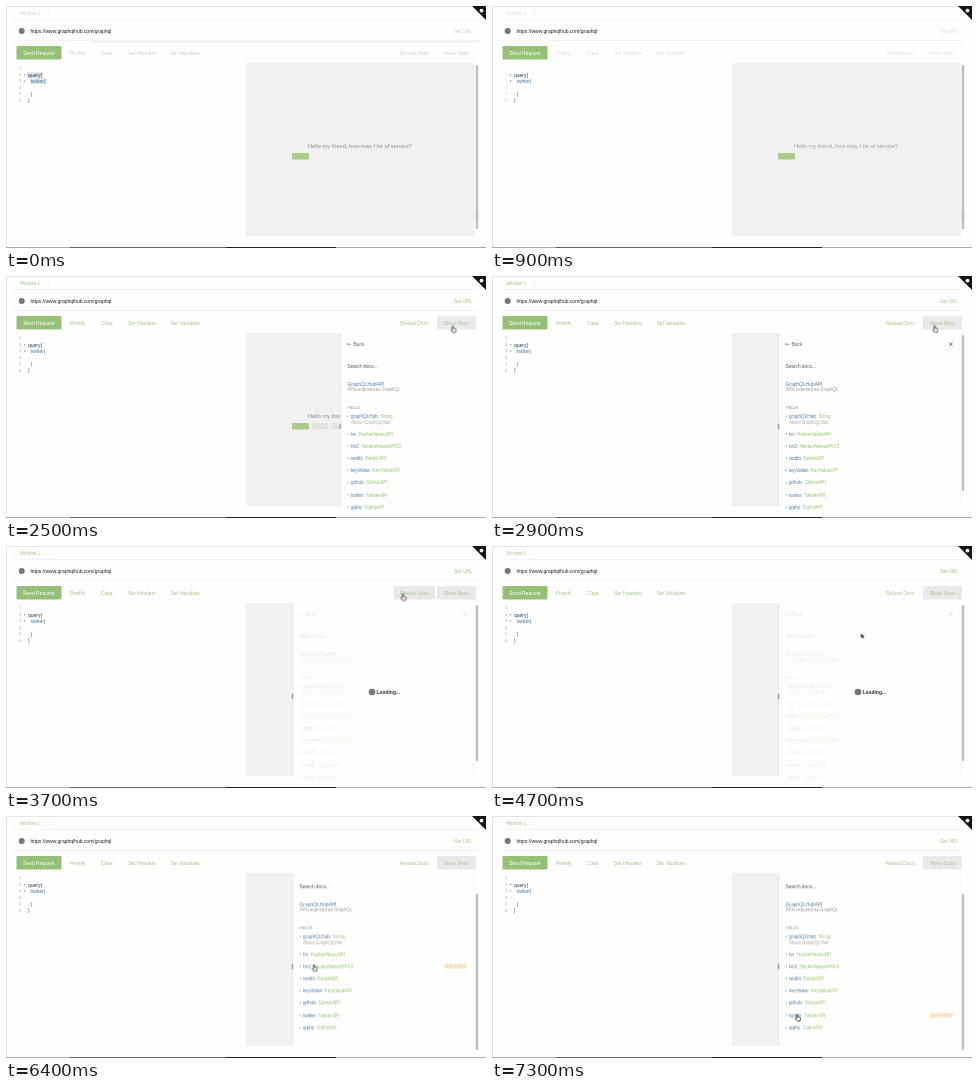
Write an HTML page that moves like this. It is 480x242 px and loops after 8000 ms.

```html
<!DOCTYPE html>
<html lang="en">
<head>
<meta charset="utf-8">
<title>API explorer</title>
<style>
  html, body { margin: 0; width: 100%; height: 100%; overflow: hidden; background: #fff; }
  svg { display: block; width: 100%; height: 100%; font: 5px "Liberation Sans", Arial, sans-serif; }
  .a { animation: 8s linear infinite; }
  .step { animation-timing-function: step-end; }

  .labels { animation-name: labels; fill: #a3c587; }
  @keyframes labels {
    0%, 1% { fill: #ccd0c9; }
    12%, 24% { fill: #e0e2de; }
    30%, 100% { fill: #a3c587; }
  }
  .nums { animation-name: nums; }
  @keyframes nums {
    0%, 1% { fill: #aaa; }
    12%, 24% { fill: #ddd; }
    30%, 100% { fill: #a8a8a8; }
  }
  .marks { animation-name: marks; }
  @keyframes marks { 0%, 1% { opacity: 1; } 11%, 100% { opacity: 0; } }

  .greet { animation-name: greet; }
  @keyframes greet {
    0%, 1% { fill: #8c8c8c; }
    12%, 24% { fill: #a4a4a4; }
    30%, 100% { fill: #888; }
  }
  .pills { animation-name: pills; }
  @keyframes pills { 0%, 24% { opacity: 0; } 30%, 100% { opacity: 1; } }

  .show { animation-name: show; }
  @keyframes show { 0% { opacity: 0; } 25%, 100% { opacity: 1; } }
  .reload { animation-name: reload; }
  @keyframes reload { 0% { opacity: 0; } 43.75% { opacity: 1; } 48.75%, 100% { opacity: 0; } }

  .panel { animation-name: slide; }
  @keyframes slide {
    0% { transform: translateX(184px); }
    29.375% { transform: translateX(184px); animation-timing-function: ease; }
    33.625%, 100% { transform: none; }
  }
  .docs { animation-name: docs; }
  @keyframes docs { 0% { opacity: 1; } 45% { opacity: .16; } 60%, 100% { opacity: 1; } }
  .load { animation-name: load; }
  @keyframes load { 0% { opacity: 0; } 45% { opacity: 1; } 60%, 100% { opacity: 0; } }
  .scroll { animation-name: scroll; }
  @keyframes scroll {
    0%, 74% { transform: none; animation-timing-function: ease-in-out; }
    79%, 100% { transform: translateY(-19.7px); }
  }
  .thumb { animation-name: thumb; }
  @keyframes thumb {
    0%, 74% { transform: none; animation-timing-function: ease-in-out; }
    79%, 100% { transform: translateY(19px); }
  }
  .bar { animation-name: bar; }
  @keyframes bar { 0% { opacity: 1; } 29.3% { opacity: 0; } 33.6%, 100% { opacity: 1; } }
  .tail { animation-name: tail; }
  @keyframes tail { 0% { opacity: 1; } 29.3%, 100% { opacity: 0; } }

  .tag { animation-name: tag; }
  @keyframes tag {
    0% { opacity: 0; transform: translateY(140.5px); }
    70% { opacity: 1; transform: translateY(140.5px); }
    76.25% { opacity: .8; transform: translateY(150.3px); }
    81.25% { opacity: .8; transform: translateY(162.5px); }
    83.5% { opacity: .8; transform: translateY(174.7px); }
    86.25% { opacity: .8; transform: translateY(187px); }
    88.75%, 100% { opacity: .8; transform: translateY(199.2px); }
  }

  .cursor { animation-name: move; }
  @keyframes move {
    0%, 12.5% { transform: translate(330px, 130px); animation-timing-function: ease-in-out; }
    18.75%, 23.75% { transform: translate(453.5px, 48.5px); }
    27%, 33.75% { transform: translate(447.5px, 53.5px); }
    42.5% { transform: translate(433px, 52.5px); }
    45%, 47.5% { transform: translate(397.5px, 51.5px); animation-timing-function: ease-in-out; }
    53.75%, 62.5% { transform: translate(370.5px, 90px); animation-timing-function: ease-in-out; }
    67.5%, 79% { transform: translate(309px, 147px); }
    83.75% { transform: translate(307px, 171.5px); }
    85% { transform: translate(307px, 172px); }
    91.25%, 100% { transform: translate(306px, 202px); }
  }
  .hand { animation-name: hand; }
  @keyframes hand { 0% { opacity: 0; } 17.5% { opacity: 1; } 48.75% { opacity: 0; } 66.25%, 100% { opacity: 1; } }
  .arrow { animation-name: arrow; }
  @keyframes arrow { 0% { opacity: 0; } 12.5% { opacity: 1; } 17.5% { opacity: 0; } 48.75% { opacity: 1; } 66.25%, 100% { opacity: 0; } }
</style>
</head>
<body>
<svg viewBox="0 0 480 242" preserveAspectRatio="none">
  <defs>
    <clipPath id="view"><rect x="240" y="57" width="229" height="178"/></clipPath>
  </defs>
  <rect width="480" height="242" fill="#fefefe"/>

  <!-- window frame -->
  <path d="M0 .5H480M.5 0V242" stroke="#e4e4e4" fill="none"/>
  <path d="M0 241.5H480" stroke="#aaa"/>
  <path d="M64 241.5H220" stroke="#666"/>
  <path d="M220 241.5H330" stroke="#222"/>
  <path d="M7 13.5H473M42.5 4V10M7 34.5H473" stroke="#f4f4f4" fill="none"/>
  <path class="a marks" d="M85 36H473" stroke="#e6e6e6"/>

  <!-- address and toolbar -->
  <circle cx="15.7" cy="25" r="3" fill="#777"/>
  <text x="24.5" y="26.8" fill="#222">https://www.graphqlhub.com/graphql</text>
  <rect x="10.5" y="40" width="45" height="13.6" rx="1" fill="#96c075"/>
  <text x="17" y="48.8" fill="#fff">Send Request</text>
  <rect class="a step reload" x="388" y="40" width="41" height="13.6" rx="1" fill="#e9e9e9"/>
  <rect class="a step show" x="431" y="40" width="39" height="13.6" rx="1" fill="#e9e9e9"/>
  <g class="a labels">
    <text x="14" y="8.6" font-size="4.6">Window 1</text>
    <text x="448" y="26.8" font-size="4.8">Set URL</text>
    <text x="64" y="48.8">Prettify</text>
    <text x="95" y="48.8">Clear</text>
    <text x="122" y="48.8">Set Headers</text>
    <text x="164.5" y="48.8">Set Variables</text>
    <text x="394" y="48.8">Reload Docs</text>
    <text x="437.5" y="48.8">Show Docs</text>
  </g>

  <!-- editor -->
  <g class="a marks" fill="#e6e6e6">
    <rect x="21" y="66" width="16" height="6"/>
    <rect x="24" y="72" width="17" height="6"/>
  </g>
  <g id="nums" class="a nums" font-size="4.4"></g>
  <path d="M17.6 68.2h2l-1 1.5zM17.6 74.4h2l-1 1.5z" fill="#888"/>
  <text x="22" y="70.6" fill="#24405f">query{</text>
  <text x="24.5" y="76.8" fill="#4479a5">twitter{</text>
  <text x="24.5" y="89.8" fill="#557">}</text>
  <text x="22" y="96" fill="#557">}</text>

  <!-- result area -->
  <rect x="240" y="57" width="229" height="173" fill="#f1f1f1"/>
  <text class="a greet" x="302" y="141.8" font-size="5.7">Hello my friend, how may I be of service?</text>
  <rect x="286" y="147" width="17" height="6.6" rx="1" fill="#a9cb8c"/>
  <g class="a pills" fill="#e3e5e1">
    <rect x="306" y="147" width="16.5" height="6.6" rx="1"/>
    <rect x="325" y="147" width="16.5" height="6.6" rx="1"/>
  </g>

  <!-- docs panel -->
  <g clip-path="url(#view)">
    <g class="a panel">
      <rect x="287" y="57" width="183" height="178" fill="#fefefe"/>
      <path d="M286.8 57V230" stroke="#ddd" stroke-width=".6"/>
      <path d="M468.4 57V234" stroke="#eee" stroke-width=".6"/>
      <rect x="285.8" y="148" width="1.4" height="5" fill="#999"/>
      <g class="a step docs">
        <g class="a scroll" id="docs">
          <path d="M297.5 68.3H293.6M295 66.9L293.6 68.3L295 69.7" fill="none" stroke="#555" stroke-width=".5"/>
          <text x="299.5" y="70.1" fill="#666">Back</text>
          <path d="M457.2 66.5l3.4 3.4m0-3.4l-3.4 3.4" stroke="#444" stroke-width=".8"/>
          <text x="293.5" y="92.4" font-size="4.75" fill="#555">Search docs...</text>
          <text x="293.5" y="109.8" font-size="4.9" fill="#4f7ea8">GraphQLHubAPI</text>
          <text x="293.5" y="115.4" font-size="4.45" fill="#999">APIs exposed as GraphQL</text>
          <text x="293.5" y="133.4" font-size="3.6" fill="#888">FIELDS</text>
          <text x="297" y="147.6" font-size="4.5" fill="#aaa">About GraphQLHub</text>
        </g>
      </g>
      <g class="a step load">
        <circle cx="366" cy="146" r="3.3" fill="#777"/>
        <text x="370.5" y="147.8" font-weight="bold" font-size="5" fill="#333">Loading...</text>
      </g>
    </g>
    <g class="a step tag">
      <rect x="438" y="-2.8" width="23" height="5.6" rx=".8" fill="#fdebd0"/>
      <text x="449.5" y="1.3" font-size="3.5" text-anchor="middle" fill="#e8b878">ADD QUERY</text>
    </g>
  </g>

  <g class="a step bar">
    <rect class="a thumb" x="469.8" y="59" width="2.4" height="156" rx="1.2" fill="#bdbdbd"/>
  </g>
  <rect class="a step tail" x="469.8" y="205" width="2.4" height="18" rx="1.2" fill="#bdbdbd"/>

  <path d="M466 0H480V14z" fill="#151515"/>
  <circle cx="475.5" cy="4.6" r="1.9" fill="#fff"/>

  <g class="a cursor">
    <path class="a step hand" d="M-1.2 -3.2q.6-.6 1.1 0V-1l2.2.5q.7.3.5 1.2L2 3H-.8L-2.6.6q.2-.9 1.4 0z"
      fill="#fff" stroke="#222" stroke-width=".7" stroke-linejoin="round"/>
    <path class="a step arrow" d="M-1.6 -3V2.2L-.4 1.2L.4 3L1.3 2.6L.6 .9H2.1z"
      fill="#111" stroke="#fff" stroke-width=".3"/>
  </g>
</svg>
<script>
  const NS = "http://www.w3.org/2000/svg";
  function add(parent, name, attrs, text = "") {
    const el = document.createElementNS(NS, name);
    for (const key in attrs) el.setAttribute(key, attrs[key]);
    el.textContent = text;
    return parent.appendChild(el);
  }

  const nums = document.getElementById("nums");
  for (let i = 0; i < 6; i++) add(nums, "text", { x: 13, y: 63.2 + i * 6.55 }, i + 1);

  const docs = document.getElementById("docs");
  const fields = [
    ["graphQLHub", "String"], ["hn", "HackerNewsAPI"], ["hn2", "HackerNewsAPIV2"],
    ["reddit", "RedditAPI"], ["keyValue", "KeyValueAPI"], ["github", "GithubAPI"],
    ["twitter", "TwitterAPI"], ["giphy", "GiphyAPI"]
  ];
  fields.forEach(([name, type], i) => {
    const y = i ? 145.6 + i * 12.22 : 140.3;
    add(docs, "circle", { cx: 294.3, cy: y, r: 0.7, fill: "#8a9" });
    const row = add(docs, "text", { x: 297, y: y + 1.7, "font-size": 4.7 });
    add(row, "tspan", { fill: "#4f7ea8" }, name);
    add(row, "tspan", { fill: "#999" }, ": ");
    add(row, "tspan", { fill: "#96c46c" }, type);
  });
</script>
</body>
</html>
```
